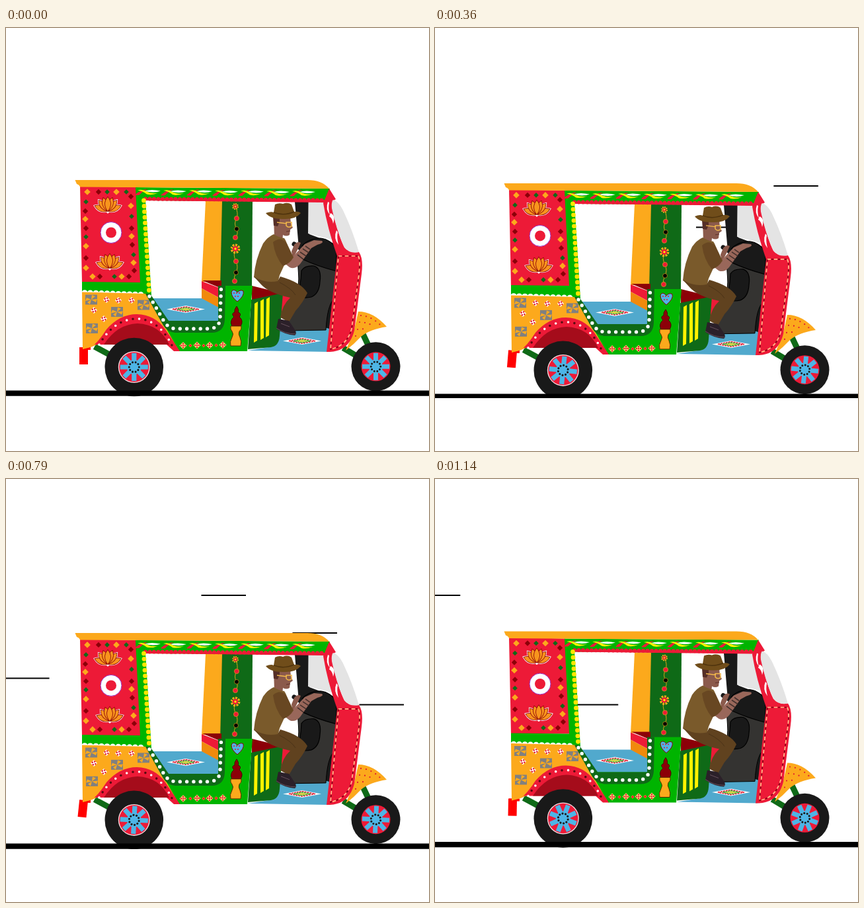
An HTML page without scripts for the animation above (1.21 s loop, 640 by 640 pixels).

```html
<!DOCTYPE html>
<html lang="en">
<head>
<meta charset="utf-8">
<title>Painted rickshaw</title>
<style>
/* --u counts 30 ticks per loop; every moving part derives from it */
@property --u { syntax: "<number>"; inherits: true; initial-value: 0; }
html, body { margin: 0; width: 100%; height: 100%; overflow: hidden; background: #fff; }
svg { display: block; width: 100%; height: 100%; animation: tick 1210ms -4ms infinite; }
@keyframes tick {
  0% { --u: 0; animation-timing-function: steps(1); }
  5.882% { --u: 1; animation-timing-function: steps(3); }
  23.529% { --u: 7; animation-timing-function: steps(1); }
  29.412% { --u: 8; animation-timing-function: steps(3); }
  47.059% { --u: 14; animation-timing-function: steps(1); }
  52.941% { --u: 15; animation-timing-function: steps(3); }
  70.588% { --u: 21; animation-timing-function: steps(1); }
  76.471% { --u: 22; animation-timing-function: steps(4); }
  100% { --u: 30; }
}
.wind { transform: translateX(calc(var(--u) * -36.08px)); }
.bob { transform: translateY(calc(min(var(--u) * .61, 5, (30 - var(--u)) * .262) * 1px)); }
.spin { transform: rotate(calc(var(--u) * 12deg)); }
.flap { transform: rotate(calc(min(var(--u) * .6, (30 - var(--u)) * .53) * 1deg)); }
.red { fill: #ed1a37; } .wine { fill: #a50c1b; } .maroon { fill: #8c0008; }
.org { fill: #fca91c; } .grn { fill: #00b400; } .pine { fill: #0f6a17; }
.blue { fill: #51a9cd; } .sky { fill: #4db5e6; } .yel { fill: #fff200; }
.blk { fill: #191919; } .gry { fill: #e4e4e4; } .wht { fill: #fff; }
.skin { fill: #8b5a4c; } .shirt { fill: #7a5a2b; } .sleeve { fill: #684722; } .pants { fill: #60421f; }
.dots { fill: none; stroke-linecap: round; }
.line { fill: none; }
</style>
</head>
<body>
<svg viewBox="0 0 640 640">
<defs>
  <clipPath id="stage"><path d="M0 0H640V560H0Z"/></clipPath>
  <marker id="mo" markerUnits="userSpaceOnUse" markerWidth="12" markerHeight="12" refX="6" refY="6"><path class="org" d="M6 1.200L10.800 6L6 10.800L1.200 6Z"/></marker>
  <marker id="mm" markerUnits="userSpaceOnUse" markerWidth="12" markerHeight="12" refX="6" refY="6"><path class="maroon" d="M6 1.800L10.200 6L6 10.200L1.800 6Z"/></marker>
  <marker id="mg" markerUnits="userSpaceOnUse" markerWidth="12" markerHeight="12" refX="6" refY="6"><path class="pine" d="M6 2.200L9.800 6L6 9.800L2.200 6Z"/></marker>
  <path id="petal" d="M0 9Q-8 -2 0 -12Q8 -2 0 9Z"/>
  <g id="lotus" fill="#f7951d" stroke="#fff" stroke-width="3.2" paint-order="stroke">
    <g stroke="#fff">
      <use href="#petal" transform="rotate(-68 0 9)"/><use href="#petal" transform="rotate(68 0 9)"/>
      <use href="#petal" transform="rotate(-40 0 9)"/><use href="#petal" transform="rotate(40 0 9)"/>
    </g>
    <g stroke="#8c0008" stroke-width="1.6">
      <use href="#petal" transform="rotate(-68 0 9)"/><use href="#petal" transform="rotate(68 0 9)"/>
      <use href="#petal" transform="rotate(-40 0 9)"/><use href="#petal" transform="rotate(40 0 9)"/>
      <use href="#petal" transform="rotate(-19 0 9)"/><use href="#petal" transform="rotate(19 0 9)"/>
      <use href="#petal"/>
    </g>
    <circle cy="11" r="1.5" class="wht" stroke="none"/>
  </g>
  <g id="leaf">
    <path class="red" d="M-22 5Q-14 -3 -2 -4Q-11 0 -15 5Q-19 6 -22 5Z"/>
    <path class="yel" d="M-18 -2Q-10 -4 -4 0Q3 4 13 2Q4 6 -4 4Q-10 -1 -18 -2Z"/>
    <path class="wht" d="M-7 -1Q3 -4 17 -1Q6 3 -7 -1Z"/>
  </g>
  <g id="tile">
    <path fill="#808080" d="M-9 -7.5H9V7.5H-9Z"/>
    <path class="org" d="M0 0L1 -7L6 -5ZM0 0L9 -1L7 4ZM0 0L-2 7L-6 4ZM0 0L-9 2L-7 -3Z"/>
  </g>
  <g id="bloom">
    <path class="wht" d="M0 -5L5 0L0 5L-5 0Z"/>
    <circle r="2.5" class="line" stroke="#e0182f" stroke-width="2.2" pathLength="8" stroke-dasharray="1.2 .8"/>
  </g>
  <g id="stud">
    <path d="M0 -5.5L5.5 0L0 5.5L-5.5 0Z" fill="#ffd27a"/>
    <path d="M0 -4V4M-4 0H4" stroke="#e0182f" stroke-width="2.2" stroke-dasharray="2 1"/>
  </g>
  <g id="daisy">
    <circle r="4.6" class="line" stroke="#fca91c" stroke-width="4" pathLength="16" stroke-dasharray="1.3 .7"/>
    <circle r="3.6" class="red"/><circle r="1.5" class="yel"/>
  </g>
  <g id="rug">
    <path class="wht" d="M-29 0L0 -5.5L29 0L0 5.5Z"/>
    <path class="line" d="M-20 0L0 -3.8L20 0L0 3.8Z" stroke="#e0182f" stroke-width="1.5" stroke-dasharray="3 1"/>
    <path d="M-13 0L0 -2.500L13 0L0 2.500Z" fill="#d9d34a" stroke="#27a33a" stroke-width="1.2" stroke-dasharray="3 1"/>
  </g>
  <g id="rim">
    <circle r="22" class="red"/>
    <g class="spin">
      <g id="bar"><path id="spoke" d="M0 -20.500V20.500" stroke="#4db5e6" stroke-width="7"/><use href="#spoke" transform="rotate(90)"/></g>
      <use href="#bar" transform="rotate(45)"/>
      <circle r="10.500" class="sky"/>
      <circle r="7.3" class="dots" stroke="#191919" stroke-width="3" pathLength="10" stroke-dasharray="0 1"/>
    </g>
  </g>
</defs>

<g class="wind" stroke="#000" stroke-width="2">
  <path d="M981 176h67.5M801 239h67.5M683.6 301.5h67.5M1119 233h67.5M1220 341.5h67.5"/>
</g>

<g clip-path="url(#stage)"><g class="bob">
  <!-- struts and flap -->
  <path d="M134 482L160 496M510 484L532 497M540 463L550 484" stroke="#0f6a17" stroke-width="9"/>
  <path d="M112 483H128V487H112Z" fill="#f00"/>
  <g transform="translate(118 484)"><path class="flap" fill="#f00" d="M-7 -1H6V25H-7Z"/></g>

  <!-- pillars, seat and rear floor -->
  <path class="org" d="M302 262H328L326 384H296Z"/>
  <path class="pine" d="M327 262H373L372 392H324Z"/>
  <path class="blue" d="M217 409H297L322 422V444H245Z"/>
  <use href="#rug" x="272" y="425.500"/>
  <path class="maroon" d="M297 382H326V392H321Z"/>
  <path class="red" d="M296 383L322 393V408L296 394Z"/>
  <path fill="#f08a0c" d="M296 394L322 408V423L296 409Z"/>

  <!-- garland -->
  <path class="line" d="M347 270Q352 280 349 288Q344 296 349 304Q352 312 347 317M347 334Q343 344 348 353Q352 362 348 370Q344 377 346 383" stroke="#d6a21c"/>
  <use href="#daisy" transform="translate(347 270) scale(.75)"/>
  <use href="#daisy" transform="translate(347 334) scale(1.12)"/>
  <g stroke="#d6a21c" stroke-width=".7">
    <circle class="red" cx="349" cy="288" r="3.6"/><circle cx="349" cy="304" r="3.4"/><circle class="red" cx="347" cy="317" r="3.6"/>
    <circle class="red" cx="348" cy="353" r="3.6"/><circle cx="348" cy="370" r="3.4"/><circle class="red" cx="346" cy="383" r="3.6"/>
  </g>

  <!-- front floor and driver seat -->
  <path class="blue" d="M366 488L404 482L416 448H492L488 490Z"/>
  <use href="#rug" x="448" y="473.500"/>
  <path class="maroon" d="M372 390L433 405L416 409L372 412Z"/>
  <path class="red" d="M413 403L433 405L420 434L414 440Z"/>
  <path class="pine" d="M371 411L419 401L414 466Q413 481 401 483L366 486Z"/>
  <path class="yel" d="M376 417L381 414L380 473L375 476ZM385 413L390 410L390 469L385 472ZM394 410L399 407L398 465L393 468Z"/>

  <!-- cab interior -->
  <path class="blk" d="M437 263H459V312L502 328L498 400L489 455L440 440L444 345Z"/>
  <path class="gry" d="M457.500 263H482L486 290L497 321L457 311Z"/>
  <path fill="#343331" stroke="#000" d="M441 347Q470 356 501 366L496 410Q486 420 484 457L424 458L430 425Q442 408 443 380Z"/>
  <path class="blk" stroke="#000" stroke-width="1.2" d="M447 367Q452 359 466 360Q478 364 475 384Q474 402 462 407Q450 410 441 405Q446 390 447 367Z"/>
  <path class="blk" stroke="#000" stroke-width="1.2" d="M444 336Q452 319 476 318Q492 320 500 335V368Q470 360 449 350Z"/>
  <path d="M436 327L449 335" stroke="#191919" stroke-width="7" stroke-linecap="round"/>

  <!-- rear panel -->
  <path class="red" d="M112 239L197 241L204 385H115Z"/>
  <g class="line">
    <polyline marker-start="url(#mo)" marker-mid="url(#mo)" marker-end="url(#mo)" points="123,248 167,248 189,269 190,315 193,355 175,376 131,376 121,363 121,330 120,289"/>
    <polyline marker-start="url(#mm)" marker-mid="url(#mm)" marker-end="url(#mm)" points="140,248 189,255 190,303 191,328 194,367 186,376 142,376 121,348 121,303 120,277"/>
    <polyline marker-start="url(#mg)" marker-mid="url(#mg)" marker-end="url(#mg)" points="153,248 182,248 190,285 193,343 164,376 121,316 121,263"/>
  </g>
  <use href="#lotus" x="154" y="268"/>
  <use href="#lotus" x="157" y="354"/>
  <circle class="wht" cx="159" cy="309.500" r="16" stroke="#9b2fc0"/>
  <circle class="red" cx="159" cy="309.500" r="8"/>

  <!-- green frame -->
  <path class="grn" d="M196 241L490 243L483 263L211 261L220 404L115 400V384L203 385Z"/>
  <path class="red" d="M209 258L485 260L481 264L211 261Z"/>
  <path class="dots" d="M211 258.500L482 260.500" stroke="#ed1a37" stroke-width="6" stroke-dasharray="0 6.500"/>
  <path class="dots" d="M208.500 261L216.500 398" stroke="#ffe600" stroke-width="6.800" stroke-dasharray="0 8.500"/>
  <path class="dots" d="M119 401L212 404" stroke="#fff" stroke-width="9.500" stroke-dasharray="0 8.500"/>
  <use href="#leaf" x="217" y="247.500"/><use href="#leaf" x="256" y="248"/><use href="#leaf" x="295" y="248"/>
  <use href="#leaf" x="334" y="248.500"/><use href="#leaf" x="373" y="248.500"/><use href="#leaf" x="412" y="249"/>
  <use href="#leaf" x="451" y="249"/>
  <path class="org" d="M104.500 230H456Q478 230 489 243L112 240.500Q111 237 107 236Z"/>

  <!-- lower body -->
  <path class="org" d="M115 399.500L213 402L260 482L243 478H140L128 483L116 486Z"/>
  <use href="#tile" x="129" y="411"/><use href="#tile" x="208" y="419"/><use href="#tile" x="168" y="429.500"/><use href="#tile" x="130" y="454.500"/>
  <use href="#bloom" x="152" y="411"/><use href="#bloom" x="170" y="412"/><use href="#bloom" x="190" y="412"/>
  <use href="#bloom" x="133" y="427"/><use href="#bloom" x="148" y="440"/>
  <path class="grn" d="M212 402L246 443H321L328 390H373L365 489H262Z"/>
  <path class="pine" d="M211 402H218L246 443H321L321 390H332L331 441Q330 461 311 461H256Q244 460 238 450Z"/>
  <path class="dots" d="M217 406L237 440Q244 455 258 455H308Q324 454 324 437L325.500 394" stroke="#fff" stroke-width="5.400" stroke-dasharray="0 10.300"/>
  <path class="red" d="M128 484Q140 475 152 456Q172 433 198 433Q226 434 241 456Q252 472 263 489H254L243 479H134Z"/>
  <path class="wine" d="M148 479Q168 448 199 447Q232 448 247 479Z"/>
  <g class="dots" stroke-width="3.600" stroke-dasharray="0 19">
    <path d="M141 479Q164 440 198 440Q232 440 253 484" stroke="#fff"/>
    <path d="M141 479Q164 440 198 440Q232 440 253 484" stroke="#5a0a10" stroke-dashoffset="9.500"/>
  </g>
  <use href="#stud" x="268" y="480.500"/><use href="#stud" x="289" y="480"/><use href="#stud" x="308" y="480"/><use href="#stud" x="328" y="479.500"/>
  <path class="red" d="M279 478l2.500 2.500l-2.500 2.500l-2.500-2.500zM299 478l2.500 2.500l-2.500 2.500l-2.500-2.500zM318 477.500l2.500 2.500l-2.500 2.500l-2.500-2.500z" stroke="#fca91c" stroke-width=".6"/>

  <!-- heart and vase -->
  <path class="sky" stroke="#8c0008" d="M350 414Q341 407 341 400Q342 395 347 397L350 400Q355 395 359 398Q361 405 350 414Z"/>
  <path class="dots" d="M345 401H357M347 406H355" stroke="#e0182f" stroke-width="2" stroke-dasharray="0 4"/>
  <path class="maroon" stroke="#4c0004" d="M349 421Q353 427 351 430Q357 432 353 437Q360 443 355 451H342Q338 443 345 437Q340 432 346 430Q345 426 349 421Z"/>
  <path class="org" stroke="#5a2a00" d="M340 451H356Q357 456 353 459Q351 463 354 468Q357 475 355 481H340Q338 475 342 468Q345 463 342 459Q339 456 340 451Z"/>

  <!-- driver -->
  <path class="skin" d="M432 338L436 328Q441 322 446 325L442 334L434 349Z"/>
  <path class="skin" d="M405 285H430L431 296L434 302L430 305L429 313Q424 316 419 313L418 323L406 317Z"/>
  <path d="M404 286H414V293L411 300L405 299Z" fill="#552e27"/>
  <path class="line" d="M410 294L425 296M424 294H432V300Q427 303 424 299Z" stroke="#f2b84a" stroke-width="1.500"/>
  <path d="M424 308L430 307" stroke="#5d302a"/>
  <path class="shirt" d="M405 312Q413 317 421 318Q429 329 425 350L414 374L411 386Q388 388 375 377Q377 350 389 326Q396 316 405 312Z"/>
  <path class="pants" d="M375 376Q392 387 411 383L415 376Q447 385 456 401Q449 416 438 428L428 445L415 438Q418 419 430 408Q397 401 385 387Z"/>
  <path class="line" d="M414 385Q432 394 438 404" stroke="#4b3318"/>
  <path d="M412 440L428 443L438 458Q440 463 437 465Q422 464 409 455Z" fill="#2b2029"/>
  <path d="M409 454Q422 463 438 463M416 447L429 452" class="line" stroke="#66505c"/>
  <path fill="#99675a" d="M420 355L434 346L452 327L466 321L478 322Q482 325 471 328L462 333L445 357Q437 366 429 362Z"/>
  <path class="line" d="M441 343L450 350M445 339L454 345M449 334L458 340M453 330L460 335" stroke="#43302c" stroke-width="1.600"/>
  <path class="sleeve" d="M404 324Q416 314 425 326L435 347Q429 357 419 360Q407 346 404 324Z"/>
  <path d="M393 280Q401 277 405 279L407 267Q413 264 419 266Q426 263 432 267L436 278Q443 277 446 280Q438 290 419 289Q400 289 393 280Z" fill="#704d1a"/>
  <path class="line" d="M405 279Q420 285 436 278" stroke="#4e330d" stroke-width="1.500"/>

  <!-- front body -->
  <path class="org" d="M533 429Q556 429 576 452Q550 456 537 467Q526 479 514 488L526 460Z"/>
  <path class="dots" d="M537 435Q553 436 567 450M535 445Q546 445 556 451M532 456L544 455M529 466L534 462" stroke="#e0182f" stroke-width="2.200" stroke-dasharray="0 8"/>
  <path class="red" d="M489 243L499 259Q491 262 494 274Q503 315 512 332Q519 341 534 339Q541 349 538 372L527 458Q519 489 490 490H485L501 345Q486 302 480 265Z"/>
  <path class="gry" d="M495 260Q503 262 510 276Q524 305 534 339Q520 342 512 332Q500 306 493 273Q492 263 495 260Z"/>
  <path class="wht" d="M487 263Q483 274 490 283Q487 273 489 264ZM491 280Q499 283 495 296Q494 288 489 285ZM500 306Q495 318 503 328Q500 316 502 309Z"/>
  <g class="line" stroke-width="1.700">
    <path d="M503 345H533Q537 353 533 380L523 455Q516 481 491 486Z" stroke="#ffc08a" stroke-dasharray="5 5"/>
    <path d="M503 345H533Q537 353 533 380L523 455Q516 481 491 486Z" stroke="#7a0713" stroke-dasharray="3 7" stroke-dashoffset="4"/>
  </g>

  <!-- wheels and road -->
  <g transform="translate(193.800 513)">
    <circle r="44.300" class="blk"/><circle r="24" fill="#f3dfe2"/><use href="#rim" transform="scale(1.03)"/>
  </g>
  <g transform="translate(559.500 512.300)"><circle r="37" class="blk"/><use href="#rim"/></g>
  <path d="M-5 548.500H645V556.800H-5Z"/>
</g></g>
</svg>
</body>
</html>
```
